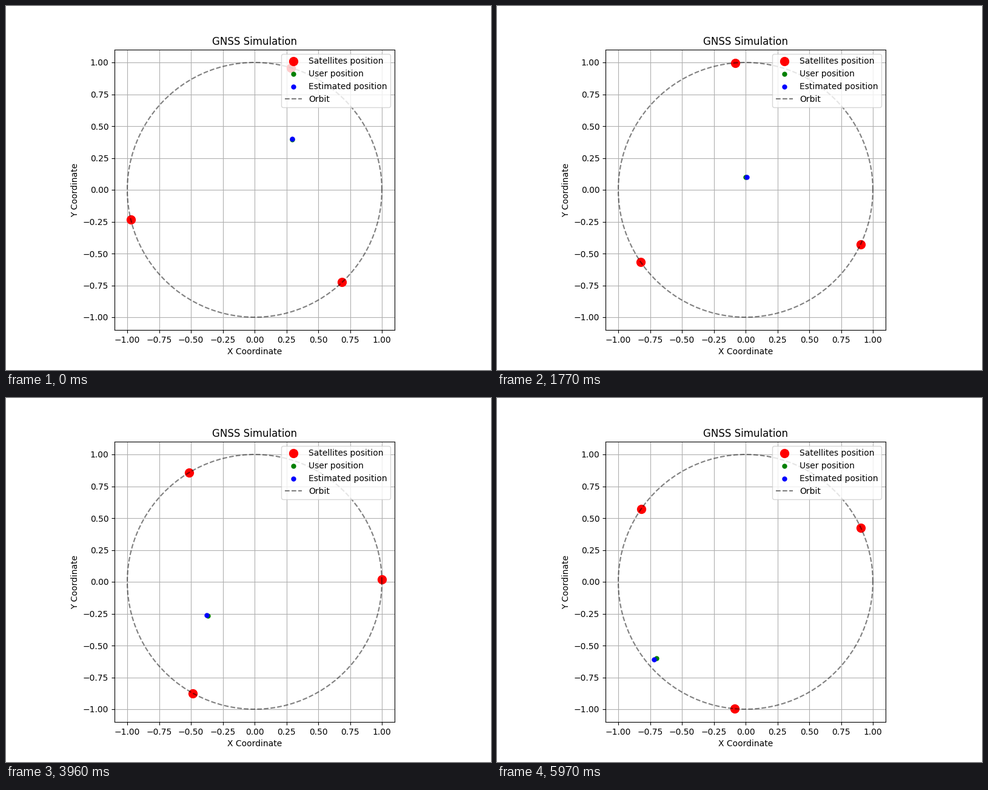
Recreate the animation shown at these times as a matplotlib script. Size 800 px wide and 600 px high, loop 6000 ms.

```python
import numpy as np
import matplotlib.pyplot as plt
from matplotlib.animation import FuncAnimation

FRAMES = 200
INTERVAL = 30
STEP = 2 * np.pi / 1000      # orbital advance per frame
PHASE = 204 * STEP
START = np.array([0.3, 0.4])
SPEED = 0.005
NOISE = 0.01

error = np.random.default_rng(7).normal(0, NOISE, (FRAMES, 2))

plt.rcParams["font.family"] = "DejaVu Sans"
fig, ax = plt.subplots(figsize=(8, 6), dpi=100)
ax.set_aspect("equal")
ax.set_xlim(-1.1, 1.1)
ax.set_ylim(-1.1, 1.1)
ax.set_title("GNSS Simulation")
ax.set_xlabel("X Coordinate")
ax.set_ylabel("Y Coordinate")
ax.grid(True)


def dots(style, size, label):
    return ax.plot([], [], style, markersize=size, label=label)[0]


sats = dots("ro", 10, "Satellites position")
user = dots("go", 5, "User position")
estimate = dots("bo", 5, "Estimated position")
theta = np.linspace(0, 2 * np.pi, 100)
ax.plot(np.cos(theta), np.sin(theta), "k--", alpha=0.5, label="Orbit")
ax.legend(loc="upper right")


def update(i):
    angles = PHASE + STEP * i + np.arange(3) * 2 * np.pi / 3
    sats.set_data(np.cos(angles), np.sin(angles))
    pos = START - SPEED * (i + 1)
    guess = pos + error[i]
    user.set_data(pos[:1], pos[1:])
    estimate.set_data(guess[:1], guess[1:])
    return sats, user, estimate


anim = FuncAnimation(fig, update, frames=FRAMES, interval=INTERVAL,
                     repeat=True, repeat_delay=0, blit=False)
plt.show()
```
